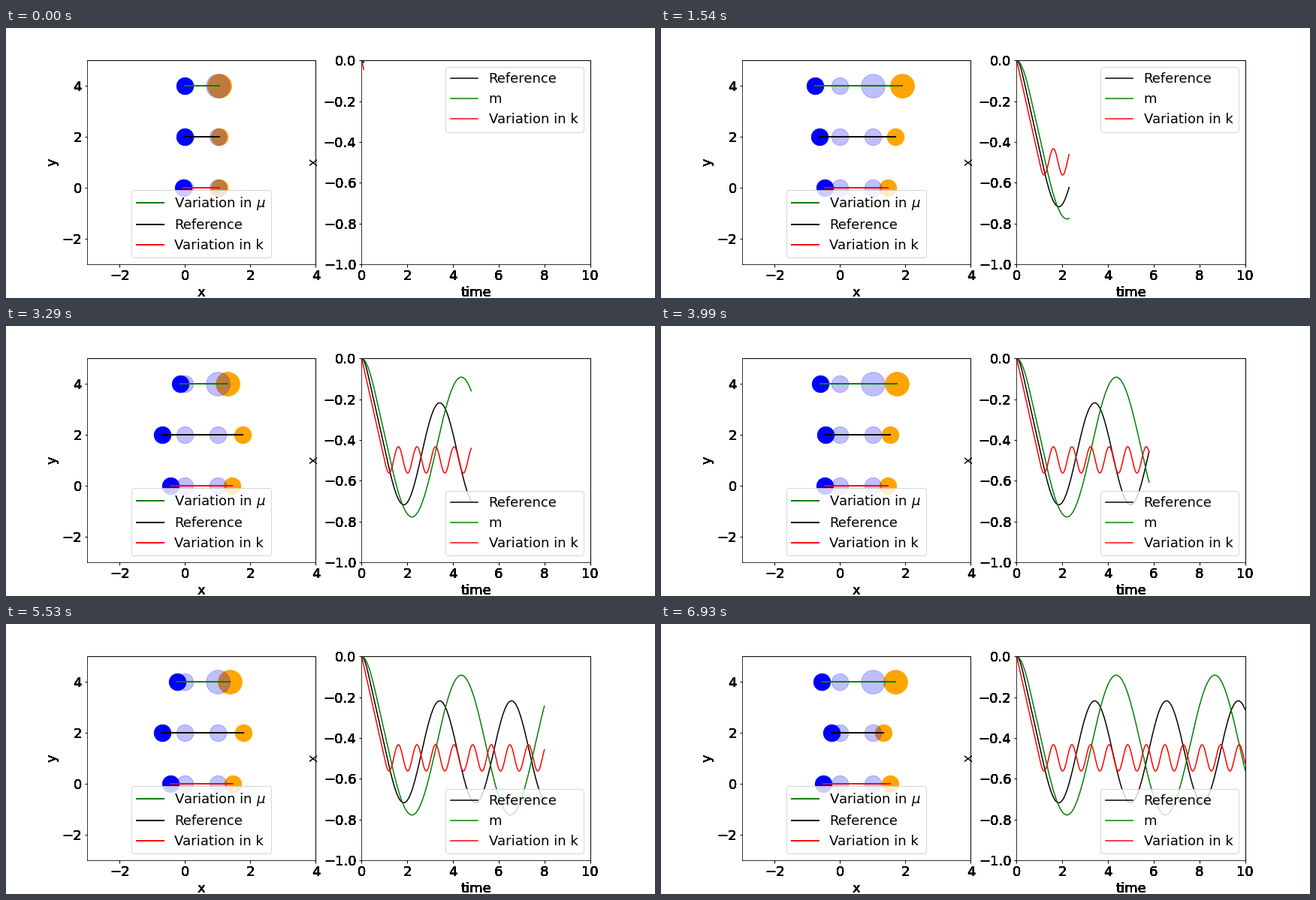
A matplotlib script that plays this animation: 864 px wide and 360 px high, repeating every 7000 ms.

```python
import numpy as np
import matplotlib.pyplot as plt
from matplotlib.animation import FuncAnimation

FRAMES, INTERVAL = 100, 70
SPEED = 0.5            # separation speed of each ball
LEGEND_SWITCH = 3.65   # time at which the curves reach the upper legend

plt.rcParams.update({"font.family": "DejaVu Sans", "font.size": 18,
                     "figure.subplot.bottom": 0.125})


class Pair:
    """Two balls that fly apart freely, then oscillate about the spring's rest length."""

    def __init__(self, y, color, label, omega, lag, size):
        self.y, self.color, self.label = y, color, label
        self.omega, self.lag, self.size = omega, lag, size
        self.t0 = 1 + lag

    def left(self, t):
        w = SPEED * (np.pi / 2 - 1) / self.lag
        start = -SPEED / w * (1 - np.cos(w * t))
        free = self.lag - SPEED * t
        swing = (self.lag - 1) / 2 - SPEED / self.omega * np.sin(self.omega * (t - self.t0))
        return np.where(w * t < np.pi / 2, start, np.where(t < self.t0, free, swing))

    def right(self, t):
        return np.where(t < self.t0, 1 + SPEED * t, 1 + self.lag - self.left(t))


heavy = Pair(4, "green", r"Variation in $\mu$", 1.458, 0.13, 1000)
ref = Pair(2, "black", "Reference", 2.0, 0.064, 500)
stiff = Pair(0, "red", "Variation in k", 7.73, 0.0045, 500)
pairs = [heavy, ref, stiff]


def overprint(text, n=8):
    """Draw a text several times so that its soft edges turn solid."""
    draw = text.draw

    def repeat(renderer):
        for _ in range(n):
            draw(renderer)

    text.draw = repeat


def style(ax, xlim, ylim, xticks, yticks, xlabel, ylabel):
    ax.set(xlim=xlim, ylim=ylim, xticks=xticks, yticks=yticks,
           xlabel=xlabel, ylabel=ylabel)
    ax.tick_params(width=1)
    for side in ("top", "right"):
        ax.spines[side].set_linewidth(1)
    for text in [*ax.get_xticklabels(), *ax.get_yticklabels(), ax.xaxis.label]:
        overprint(text)


fig, (space, graph) = plt.subplots(1, 2, figsize=(12, 5), dpi=72)
style(space, (-3, 4), (-3, 5), [-2, 0, 2, 4], [-2, 0, 2, 4], "x", "y")
overprint(space.yaxis.label)
style(graph, (0, 10), (-1, 0), range(0, 11, 2), np.linspace(-1, 0, 6), "time", "x")

balls, rods = [], []
for p in pairs:
    blue = space.scatter([0], [p.y], s=500, color="blue")
    orange = space.scatter([1], [p.y], s=p.size, color="orange")
    for x, size in ((0, 500), (1, p.size)):
        space.scatter([x], [p.y], s=size, color="blue", alpha=0.25)
    balls.append((blue, orange))
    rods += space.plot([], [], color=p.color, lw=2, label=p.label)
space.legend(loc="lower center")

curves = [(p, graph.plot([], [], color=p.color, lw=1.5, label=label)[0])
          for p, label in ((ref, "Reference"), (heavy, "m"), (stiff, "Variation in k"))]
legend = graph.legend(loc="upper right")


def update(i):
    now = (i + 1) / 10
    for p, (blue, orange), rod in zip(pairs, balls, rods):
        a, b = float(p.left(now)), float(p.right(now))
        blue.set_offsets([(a, p.y)])
        orange.set_offsets([(b, p.y)])
        rod.set_data([a, b], [p.y, p.y])
    t = np.linspace(0, now, 10 * (i + 1) + 1)
    for p, line in curves:
        line.set_data(t, p.left(t))
    legend.set_loc("upper right" if now < LEGEND_SWITCH else "lower right")
    return []


anim = FuncAnimation(fig, update, frames=FRAMES, interval=INTERVAL,
                     init_func=lambda: update(0), repeat=True, repeat_delay=0)
plt.show()
```
